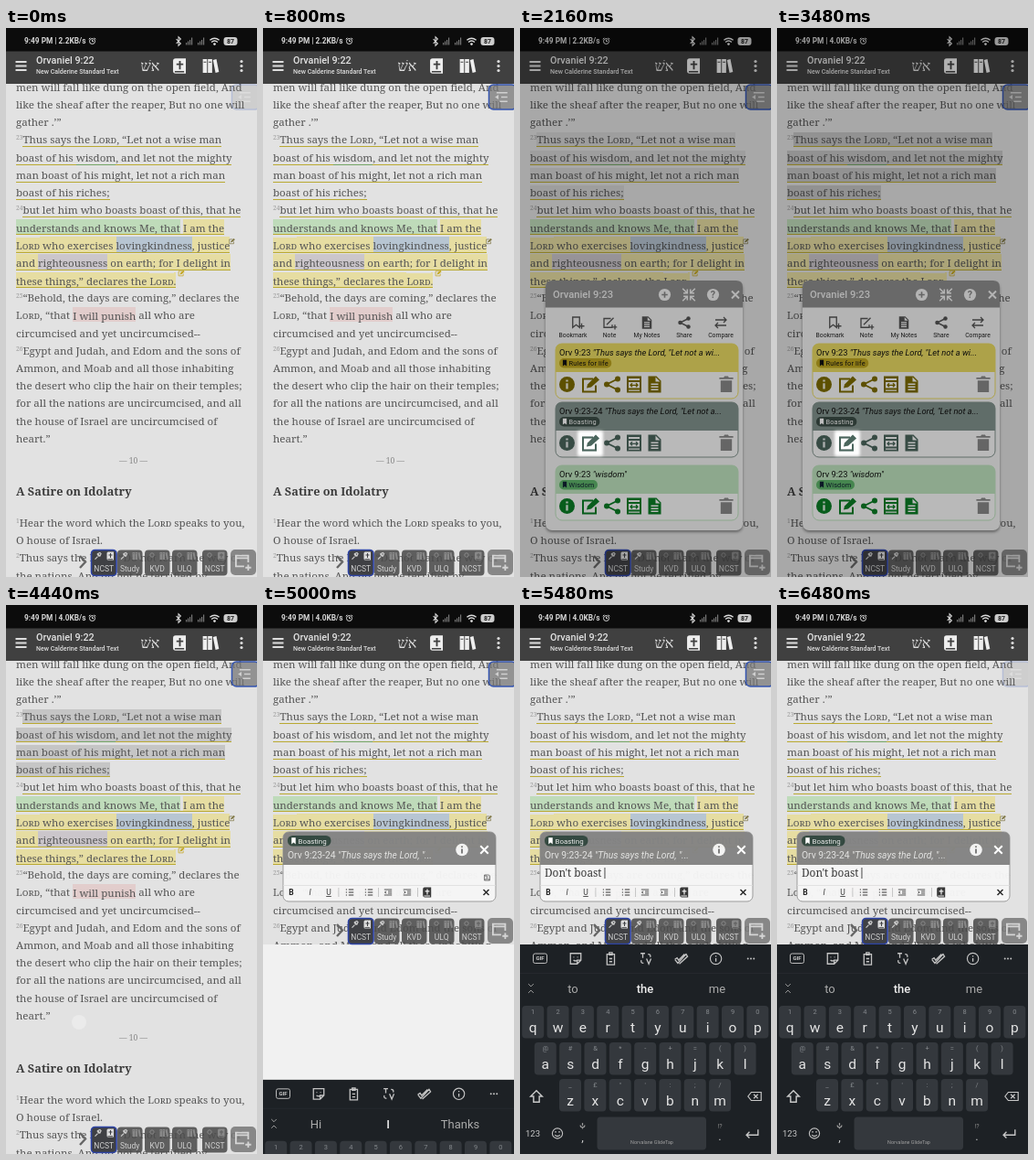
Animation of 275x600 px, one loop 8000 ms. Source, as an HTML page:

```html
<!DOCTYPE html>
<html lang="en">
<head>
<meta charset="utf-8">
<style>
html, body { margin: 0; width: 100%; height: 100%; overflow: hidden; background: #e2e2e2; }
#stage { position: relative; width: 275px; height: 600px; overflow: hidden; }
#page { position: absolute; inset: 0; font: 11.55px/19.2px "Noto Serif", serif; color: #555; --sel: 0; }
#page div { position: absolute; left: 11px; white-space: pre; }
#page sup { font-size: 6.6px; line-height: 0; vertical-align: 4px; color: #999; }
.sc { font-variant: small-caps; font-size: .93em; }
.u { border-bottom: 1.6px solid #b9a932; }
.sel { background: rgba(0, 0, 0, calc(var(--sel) * .13)); }
.w { border-bottom: 1.4px solid #74a565; }
.g, .y, .b, .v, .p { padding-top: 1.5px; }
.g { background: #bfdbba; }
.y { background: #e6dda2; }
.b { background: #b7c5d2; }
.v { background: #cbc6cb; }
.p { background: #e2cdcc; }
svg { position: absolute; left: 0; top: 0; }
svg text { white-space: pre; }
</style>
</head>
<body>
<div id="stage"><div id="page"></div><svg id="art" width="275" height="600" viewBox="0 0 275 600"></svg></div>
<script>
const $ = id => document.getElementById(id);
const all = sel => document.querySelectorAll(sel);
const BOOK = 'Orvaniel', ABBR = 'Orv', EDITION = 'NCST';

// ---- page text: [row, verse number, text, style]
const LORD = '{sc Lord}';
const lines = [
  [-3, '', 'men will fall like dung on the open field, And'],
  [-2, '', 'like the sheaf after the reaper, But no one will'],
  [-1, '', 'gather .’”'],
  [0, 23, `Thus says the ${LORD}, “Let not a wise man`, 'u sel'],
  [1, '', 'boast of his {w wisdom}, and let not the mighty', 'u sel'],
  [2, '', 'man boast of his might, let not a rich man', 'u sel'],
  [3, '', 'boast of his riches;', 'u sel'],
  [4, 24, 'but let him who boasts boast of this, that he', 'u'],
  [5, '', '{g understands and knows Me, that} {y I am the}', 'u'],
  [6, '', `{y sc Lord}{y  who exercises }{b lovingkindness}{y , justice}`, 'u'],
  [7, '', '{y and }{v righteousness}{y  on earth; for I delight in}', 'u'],
  [8, '', '{y these things,” declares the }{y sc Lord}{y .}', 'u'],
  [9, 25, '“Behold, the days are coming,” declares the'],
  [10, '', `${LORD}, “that {p I will punish} all who are`],
  [11, '', 'circumcised and yet uncircumcised--'],
  [12, 26, 'Egypt and Judah, and Edom and the sons of'],
  [13, '', 'Ammon, and Moab and all those inhabiting'],
  [14, '', 'the desert who clip the hair on their temples;'],
  [15, '', 'for all the nations are uncircumcised, and all'],
  [16, '', 'the house of Israel are uncircumcised of'],
  [17, '', 'heart.”'],
  [21.8, 1, `Hear the word which the ${LORD} speaks to you,`],
  [22.8, '', 'O house of Israel.'],
  [23.8, 2, `Thus says the ${LORD}, “Do not learn the way of`],
  [24.8, '', 'the nations, And do not be terrified by']
];
const mark = s => s.replace(/\{((?:sc|[a-z])(?: sc)?) ([^}]*)\}/g, '<span class="$1">$2</span>');
$('page').innerHTML = lines.map(([k, n, s, c = '']) =>
  `<div style="top:${112.4 + 19.2 * k}px">${n ? `<sup>${n}</sup>` : ''}<span class="${c}">${mark(s)}</span></div>`).join('') +
  '<div style="top:463px;left:124px;font-size:8.5px;color:#888">— 10 —</div>' +
  '<div style="top:497px;font-size:12.7px;font-weight:600;color:#3c3c3c">A Satire on Idolatry</div>';

// ---- drawing helpers
const txt = (x, y, s, size, fill = '#ccc', more = '') =>
  `<text x="${x}" y="${y + size * .36}" font-size="${size}" fill="${fill}" ${more}>${s}</text>`;
const mid = (x, y, s, size, fill, more = '') => txt(x, y, s, size, fill, 'text-anchor="middle" ' + more);
const box = (x, y, w, h, fill, r = 0, more = '') =>
  `<rect x="${x}" y="${y}" width="${w}" height="${h}" rx="${r}" fill="${fill}" ${more}/>`;
const cap = (x, y, w, h, fill) =>
  `<path d="M${x} ${y + h}v${7 - h}q0-7 7-7h${w - 14}q7 0 7 7v${h - 7}Z" fill="${fill}"/>`;
const line = (d, w = 1.6) => `<path d="${d}" fill="none" stroke="currentColor" stroke-width="${w}"/>`;
const solid = d => `<path d="${d}" fill="currentColor" fill-rule="evenodd"/>`;
const disc = (r, x = 0, y = 0) => `<circle cx="${x}" cy="${y}" r="${r}" fill="currentColor"/>`;
const ring = (r, w = 1.4) => `<circle r="${r}" fill="none" stroke="currentColor" stroke-width="${w}"/>`;

// icons are centred on 0,0 in a box of about 18
const icons = {
  menu: line('M-6-4.5H6M-6 0H6M-6 4.5H6', 2),
  dots: disc(1.6, 0, -5) + disc(1.6) + disc(1.6, 0, 5),
  more: disc(1.2, -4) + disc(1.2) + disc(1.2, 4),
  bible: solid('M-5-9H7V9H-5Q-8 9-8 6V-6Q-8-9-5-9ZM-1-6V-3H-4V-1H-1V4H1V-1H4V-3H1V-6ZM-6 6H5V7.5H-6Z'),
  shelf: solid('M-9-8H-4V8H-9ZM-3-8H2V8H-3ZM3-7L7-8L10 7L6 8ZM-8-5H-5V-4H-8ZM-2-5H1V-4H-2Z'),
  info: disc(8.5) + '<path d="M0-5V-3M0-1.2V5" stroke="#fff" stroke-opacity=".85" stroke-width="2.4"/>',
  plus: disc(8) + '<path d="M-4 0H4M0-4V4" stroke="#888" stroke-width="2"/>',
  help: disc(8) + '<text y="4.6" font-size="13" font-weight="700" text-anchor="middle" fill="#888">?</text>',
  close: line('M-5-5L5 5M5-5L-5 5', 2.4),
  shrink: line('M-8-8L-3-3M8-8L3-3M-8 8L-3 3M8 8L3 3M-7-2H-2V-7M7-2H2V-7M-7 2H-2V7M7 2H2V7', 1.8),
  edit: line('M3-6H-8V8H6V1', 2) + solid('M-4 4L-3 0L6-9L10-5L1 3Z'),
  share: disc(3, -6) + disc(3, 6, -6) + disc(3, 6, 6) + line('M6-6L-6 0L6 6', 1.9),
  range: solid('M-8-9H8V9H-8ZM-6-6.5V-4.5H6V-6.5ZM-6-2.5V4H6V-2.5ZM-6 6V7.2H6V6Z') + line('M-4 .8H4M-2-1.2L-4 .8L-2 2.8M2-1.2L4 .8L2 2.8', 1.3),
  doc: solid('M-7-9H2L7-4V9H-7ZM-4-1V.5H4V-1ZM-4 2V3.5H4V2ZM-4 5V6.5H4V5ZM1-8V-3H6Z'),
  trash: solid('M-8-8H-3L-2-9.5H2L3-8H8V-6H-8ZM-6.5-4.5H6.5V9H-6.5Z'),
  flag: solid('M-5-8H5V8L0 4L-5 8Z'),
  addFlag: line('M-7-8H3V7L-2 3L-7 7ZM6 1V9M2 5H10', 1.8),
  addNote: line('M2-6H-8V7H4V3M-4 3L6-7M8 3V10M5 6.5H11', 1.8),
  compare: line('M-8-4H8M4-8L8-4L4 0M8 4H-8M-4 0L-8 4L-4 8', 1.7),
  list: line('M-2-5H7M-2 0H7M-2 5H7M-7-5H-5M-7 0H-5M-7 5H-5', 1.7),
  jump: line('M-6-5.5H8M0 0H8M-2 5.5H8', 1.7) + solid('M-8 0L-3.5-3V3Z'),
  outdent: line('M-7-5H7M0-1.7H7M0 1.7H7M-7 5H7M-3-2L-6 0L-3 2', 1.4),
  indent: line('M-7-5H7M0-1.7H7M0 1.7H7M-7 5H7M-6-2L-3 0L-6 2', 1.4),
  save: line('M-6-6H4L6-4V6H-6ZM-3-6V-2H3M-3 6V2H3V6', 1.4),
  pin: line('M-5 6L0 1M-1-3L3 1M0-4L4-6L6-4L4 0Z', 2),
  frame: line('M6 1V-7H-9V6H1M-9-4H6M6 4V11M2.5 7.5H9.5', 2),
  clip: line('M-5-6H5V8H-5ZM-2-8H2V-5H-2ZM-2 0H2M-2 4H2'),
  sticker: line('M-7-7H7V2L2 7H-7ZM7 2H2V7M-3-2H-2M2-2H3M-3 2Q0 4 2 2'),
  swap: line('M-7-7H-1M-4-7V-1M1 0L4 7L7 0M3-6Q7-6 6-2M-3 6Q-7 6-6 2'),
  check: line('M-8 1L-4 6L7-6L9-3L-2 7M-8 1L-5-1L-3 2L5-6'),
  about: ring(7.5) + line('M0-4V-2.5M0-.5V4'),
  fold: line('M-4-7L0-3L4-7M-4 7L0 3L4 7', 1.3),
  shift: line('M0-7L-7 0H-3.5V7H3.5V0H7Z'),
  caps: solid('M0-7L-7 0H-3.5V7H3.5V0H7Z'),
  erase: line('M-8 0L-4-5H8V5H-4ZM-1-2.5L4 2.5M4-2.5L-1 2.5', 1.3),
  smile: ring(7) + disc(1, -2.5, -2) + disc(1, 2.5, -2) + line('M-3.5 2Q0 5.5 3.5 2'),
  enter: line('M8-5V2H-7M-3-2L-7 2L-3 6'),
  mic: line('M0-5V0M-4-1Q-4 3 0 3Q4 3 4-1M0 3V6', 2),
  blue: line('M-3-3L3 3L0 6V-6L3-3L-3 3', 1.3),
  wifi: line('M-6-2Q0-7 6-2M-4 .5Q0-3 4 .5', 1.6) + disc(1.6, 0, 3),
  bars: solid('M-5 5V2H-3.5V5ZM-2.5 5V0H-1V5ZM0 5V-2H1.5V5ZM2.5 5V-5H4V5Z'),
  alarm: ring(4, 1.3) + line('M0-2.5V0H2M-5-3L-3-5M5-3L3-5', 1.3)
};
const icon = (name, x, y, s = 1, color = '#ddd') =>
  `<g transform="translate(${x} ${y}) scale(${s})" color="${color}">${icons[name]}</g>`;
const group = (id, body, more = '') => `<g id="${id}" ${more}>${body}</g>`;

// ---- parts
const bars = () => box(0, 0, 275, 28, '#0c0c0c') + box(0, 25.5, 275, 35.5, '#404040') +
  txt(20, 14.5, '9:49 PM | <tspan id="speed"></tspan>', 8.3, '#d6d6d6', 'font-weight="600"') +
  icon('alarm', 94.5, 14.5, .75) + icon('blue', 189, 14.5, .8) +
  icon('bars', 201, 14.5, .8, '#777') + icon('bars', 214, 14.5, .8, '#777') + icon('wifi', 228.5, 15, .85) +
  box(238.5, 10, 15, 9, '#ccc', 3) + mid(246, 14.5, '87', 7, '#222', 'font-weight="700"') +
  icon('menu', 16.5, 41.5) + txt(33, 35, BOOK + ' 9:22', 10.8, '#e2e2e2', 'font-weight="500"') +
  txt(33, 47.3, 'New Calderine Standard Text', 7, '#dedede', 'font-weight="500"') +
  mid(158, 41, 'אשׁ', 16, '#ddd', 'font-family="Liberation Serif, serif" direction="rtl"') +
  icon('bible', 190.5, 41.5, .93, '#eee') + icon('shelf', 224, 41.5, .93, '#eee') + icon('dots', 258, 41.5);

const tab = ([x, label], i) =>
  box(x, 570.5, 27.5, 28, i ? '#4b4b4b' : '#3f4044', 4, i ? 'fill-opacity=".88"' : 'stroke="#2d43a5" stroke-width="1.6"') +
  (i < 2 ? icon('pin', x + 7, 577, .6, '#ccc') : `<circle cx="${x + 8}" cy="576" r="2.2" fill="none" stroke="#888"/>`) +
  icon(i % 4 ? 'shelf' : 'bible', x + 21, 577, .5, i ? '#888' : '#ddd') +
  mid(x + 13.7, 591, label, 8.5, '#d0d0d0');
const tabs = () => line('M81 577L87 583.5L81 590', 2.4) +
  [[93.5, EDITION], [122, 'Study'], [152, 'KVD'], [182, 'ULQ'], [215, EDITION]].map(tab).join('') +
  box(246, 570, 28, 28, '#777', 5, 'fill-opacity=".85"') + icon('frame', 260, 583, .9, '#d5d5d5');

const side = () => box(247.5, 62, 30, 27, '#777', 5, 'fill-opacity=".75" stroke="#3454b0" stroke-width="1.5"') +
  icon('jump', 261, 75.5, .85, '#d0d0d0');

const card = (y, title, tag, tint, dark, pill, ink) =>
  box(39, y, 200, 60, '#f8f8f8', 7) + cap(39, y, 200, 31, tint) +
  box(39, y, 200, 60, 'none', 7, `stroke="${tint}"`) +
  txt(43, y + 10, ABBR + title, 9.3, '#111') +
  box(43, y + 16, 0, 10.5, pill, 5) + icon('flag', 49, y + 21.2, .42, ink) +
  txt(53.5, y + 21.2, tag, 7.4, ink, 'class="tag" letter-spacing=".15"') +
  ['info', 'edit', 'share', 'range', 'doc'].map((n, i) =>
    icon(n, [51.5, 77, 101, 125, 147.5][i], y + 44.5, 1, dark)).join('') +
  icon('trash', 226, y + 44.5, .95, '#888');
const it = s => `<tspan font-style="italic">${s}</tspan>`;
const popup = () => box(28, 278, 216, 273, '#000', 7, 'fill-opacity=".4" filter="url(#soft)"') +
  box(28, 276, 216, 273, '#f2f2f2', 7) + cap(28, 276, 216, 29.5, '#8e8e8e') +
  txt(36, 291, BOOK + ' 9:23', 11.2, '#eee', 'font-weight="500"') +
  icon('plus', 158.5, 291.5, .82, '#f2f2f2') + icon('shrink', 185, 291.5, .85, '#f2f2f2') +
  icon('help', 211.5, 291.5, .82, '#f2f2f2') + icon('close', 236, 291.5, .8, '#f2f2f2') +
  [['addFlag', 63, 'Bookmark'], ['addNote', 98, 'Note'], ['doc', 139, 'My Notes'], ['share', 180, 'Share'], ['compare', 220, 'Compare']]
    .map(([n, x, s]) => icon(n, x, 322, .75, '#555') + mid(n == 'addFlag' ? 58 : x, 335.5, s, 6.8, '#222')).join('') +
  card(345, ' 9:23 ' + it('"Thus says the Lord, "Let not a wi...'), 'Rules for life', '#e9da62', '#7d6c00', '#bea51f', '#111') +
  card(409, ' 9:23-24 ' + it('"Thus says the Lord, "Let not a...'), 'Boasting', '#82938d', '#4a655c', '#3c4d46', '#fff') +
  card(478, ' 9:23 ' + it('"wisdom"'), 'Wisdom', '#bde2bd', '#0c7d26', '#5fb46a', '#123');
const spot = () => box(63, 440, 28, 28, '#fff', 2, 'fill-opacity=".7" filter="url(#soft)"') +
  icon('edit', 77, 453.5, 1, '#4a655c');

const rule = x => box(x, 309, .8, 10, '#bbb');
const note = () => box(22, 248, 233, 76, '#f6f6f6', 6, 'stroke="#999"') + cap(22, 248, 233, 36, '#848484') +
  box(27, 252, 47.5, 11.5, '#31473e', 5.5) + icon('flag', 33.5, 257.8, .45, '#fff') + txt(38.5, 257.8, 'Boasting', 7.9, '#eee') +
  txt(27, 273.5, ABBR + ' 9:23-24 ' + it('"Thus says the Lord, "...'), 10.3, '#e4e4e4') +
  `<g transform="translate(218 267.5) scale(.8)">${disc(8.5)}<path d="M0-5V-3M0-1.2V5" stroke="#777" stroke-width="2.4"/></g>` +
  icon('close', 242.5, 267.5, .85, '#fff') +
  box(22, 306, 233, .8, '#ddd') + group('save', icon('save', 245.5, 298, .5, '#444')) +
  txt(27, 293, '', 11.8, '#333', 'id="typed" font-family="Noto Serif, serif"') + box(92.5, 287, .9, 12, '#333', 0, 'id="caret"') +
  mid(31, 314, 'B', 8.5, '#222', 'font-weight="700"') + mid(51.5, 314, 'I', 8.5, '#333', 'font-style="italic"') +
  mid(72, 314, 'U', 8.5, '#333', 'text-decoration="underline"') +
  [82.5, 126, 169].map(rule).join('') +
  [['list', 95], ['list', 116], ['outdent', 137], ['indent', 158], ['bible', 180]].map(([n, x]) => icon(n, x, 314, .6, '#333')).join('') +
  icon('close', 244.5, 314, .6, '#222');

const STEP = 27.35;
const row = (keys, hints, x0, y) => [...keys].map((k, i) => {
  const x = x0 + i * STEP;
  return box(x - 12, y - 23, 24, 35.5, '#34383d', 4) + mid(x, y - 17, hints[i].replace('&', '&amp;'), 7.5, '#84888c') +
    mid(x, y, k, 15.5, '#e4e4e4', 'class="key"');
}).join('');
const keyboard = () => box(0, 371, 275, 229, '#1d2125') +
  box(14.5, 381, 15, 10.5, 'none', 2, 'stroke="#bbb"') + mid(22, 386.3, 'GIF', 6, '#ccc', 'font-weight="700"') +
  ['sticker', 'clip', 'swap', 'check', 'about', 'more'].map((n, i) => icon(n, 61 + i * 38.4, 386.5, .82, '#c4c4c4')).join('') +
  box(0, 402, 275, .6, '#2a2e32') + icon('fold', 12, 419, .7, '#aaa') +
  [58, 137, 216].map((x, i) => mid(x, 419, '', 13, i == 1 ? '#eee' : '#aaa', `class="word" ${i == 1 ? 'font-weight="500"' : ''}`)).join('') +
  row('qwertyuiop', '1234567890', 14.2, 461) + row('asdfghjkl', '@#&*-+=()', 27.8, 501) +
  row('zxcvbnm', '_£"\':;/', 55, 541) +
  group('low', icon('shift', 18, 537, .9, '#c8c8c8')) + group('up', icon('caps', 18, 537, .9, '#c8c8c8')) +
  icon('erase', 257, 537, .9, '#c8c8c8') +
  mid(14, 577.5, '123', 9.5, '#c8c8c8') + icon('smile', 41, 577.5, .8, '#c0c0c0') +
  icon('mic', 68.5, 569, .6, '#999') + mid(68.5, 581, ',', 13, '#ccc') +
  box(84.5, 559.5, 119.5, 36, '#34383d', 4) + mid(144.5, 587, 'Norvalane GlideTap', 5.4, '#a0a0a0') +
  mid(219, 569, '!?', 7, '#888') + mid(219, 580, '.', 13, '#ccc') + icon('enter', 254, 577.5, .85, '#c8c8c8');

$('art').innerHTML = `<defs><filter id="soft"><feGaussianBlur stdDeviation="1.8"/></filter>
  <mask id="hole" maskUnits="userSpaceOnUse" x="0" y="0" width="275" height="600">${box(0, 0, 275, 600, '#fff')}${box(63, 440, 28, 28, '#000', 2, 'filter="url(#soft)"')}</mask></defs>
  <g font-family="Roboto, sans-serif">` +
  icon('edit', 247.5, 233, .34, '#7c7440') + icon('edit', 192, 268, .36, '#c3a51c') +
  group('side', side()) + group('gap', box(0, 371, 275, 229, '#f1f1f1')) +
  group('tabs', tabs(), 'color="#666"') + bars() +
  group('popup', popup() + spot()) +
  group('dim', box(0, 0, 275, 600, '#000', 0, 'mask="url(#hole)"')) +
  '<circle id="tap" cx="80" cy="456" r="8" fill="#fff"/>' +
  group('note', note(), 'color="#f4f4f4"') + group('keys', keyboard()) + '</g>';

// each label pill is as wide as its text needs
all('.tag').forEach(tag =>
  tag.previousElementSibling.previousElementSibling.setAttribute('width', tag.getComputedTextLength() + 14));

// ---- motion
const ramp = (t, a, b) => Math.min(1, Math.max(0, (t - a) / (b - a)));
const fade = (id, v) => {
  $(id).style.display = v > 0 ? '' : 'none';
  $(id).setAttribute('opacity', v);
};
const shift = (id, y) => $(id).setAttribute('transform', `translate(0 ${y})`);

function draw(t) {
  const open = t < 4440 ? ramp(t, 1990, 2140) : 0;
  const resized = t >= 5000, typed = t >= 5480;
  const leave = ramp(t, 4440, 4760);
  const picked = t < 2680 ? .45 * open : t < 2800 ? .75 : 1 - leave;

  $('page').style.setProperty('--sel', picked);
  fade('popup', open);
  fade('dim', .25 * open);
  fade('side', t < 6480 ? .25 + .75 * ramp(t, 200, 800) : .25);
  fade('tap', t >= 4440 ? .3 * (1 - leave) : 0);

  fade('gap', +resized);
  shift('tabs', resized ? -228 : 0);
  fade('note', .97 * ramp(t, 4480, 4760));
  shift('note', resized ? 0 : 224);
  fade('keys', +resized);
  shift('keys', 229 * (1 - ramp(t, 4960, 5200)) ** 2.4);

  $('typed').textContent = typed ? "Don't boast" : '';
  fade('caret', +typed);
  fade('save', +!typed);
  fade('low', +typed);
  fade('up', +!typed);
  const words = typed ? ['to', 'the', 'me'] : ['Hi', 'I', 'Thanks'];
  all('.word').forEach((w, i) => w.textContent = words[i]);
  all('.key').forEach(k => {
    k.textContent = typed ? k.textContent.toLowerCase() : k.textContent.toUpperCase();
  });
  $('speed').textContent = (t < 3480 ? '2.2' : t < 6480 ? '4.0' : '0.7') + 'KB/s';
}

const start = performance.now();
let last = -1;
function tick() {
  const t = Math.floor((performance.now() - start) % 8000 / 40) * 40;
  if (t !== last) draw(last = t);
  requestAnimationFrame(tick);
}
tick();
</script>
</body>
</html>
```
